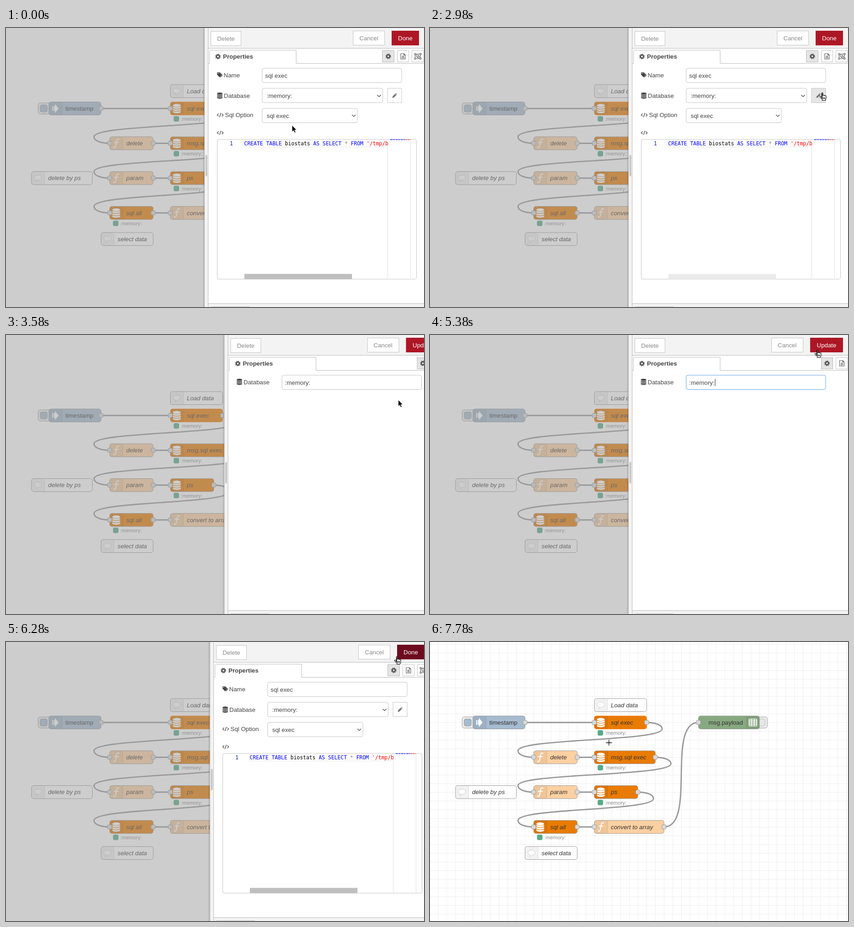
An HTML page that plays this animation: 917x611 px, repeating every 8 s.

```html
<!DOCTYPE html>
<html lang="en">
<head>
<meta charset="utf-8">
<title>Flow editor</title>
<style>
html, body { margin: 0; width: 100%; height: 100%; overflow: hidden; background: #fff; }
svg { display: block; }
text { font: 13.34px "Liberation Sans", Arial, sans-serif; fill: #444; }
.node { fill: #333; }
.it { font-style: italic; }
.status { font-size: 11.44px; fill: #888; }
.mid { text-anchor: middle; }
.end { text-anchor: end; }
.bold { font-weight: bold; }
.btn { fill: #fff; stroke: #c4c4c4; }
.btn-t { fill: #888; text-anchor: middle; }
.field { fill: #fff; stroke: #c4c4c4; }
.sel { fill: #e4e4e4; stroke: #bbb; }
.code text, .code-n { font: 11.43px "DejaVu Sans Mono", monospace; fill: #000; }
.code .k { fill: #00f; }
.code .s { fill: #f00; }
.code .o { fill: #778899; }
.code-n { fill: #0b216f; }
.line { fill: none; stroke: #bbb; }

/* every part changes in hard steps */
.an { animation: 8s step-end infinite; }
#panel { animation-name: slide; }
@keyframes slide {
  0% { transform: none; }
  41% { transform: translateX(330px); }
  42.875% { transform: translateX(484px); }
  44.75% { transform: translateX(43.5px); }
  46.625% { transform: none; }
  74.75% { transform: translateX(412px); }
  76.625% { transform: translateX(400px); }
  78.5% { transform: translateX(12px); }
  80.375% { transform: none; }
  86% { transform: translateX(46px); }
  87.875% { transform: translateX(464px); }
  89.75% { transform: translateX(500px); }
}
#nodeTray { animation-name: nodeTray; }
@keyframes nodeTray {
  0%, 76.625% { visibility: visible; }
  42.875% { visibility: hidden; }
}
#dbTray { animation-name: dbTray; }
@keyframes dbTray {
  0%, 76.625% { visibility: hidden; }
  42.875% { visibility: visible; }
}
#shade { animation-name: shade; }
@keyframes shade { 0% { opacity: 1; } 89.75% { opacity: 0; } }
#grid { animation-name: grid; }
@keyframes grid { 0% { opacity: 0; } 89.75% { opacity: 1; } }
#sql { animation-name: sql; }
@keyframes sql {
  0%, 24.125% { transform: none; }
  13%, 22.375% { transform: translateX(-52px); }
  14.875% { transform: translateX(-105px); }
}
#bar { fill: #bfbfbf; animation-name: bar; }
@keyframes bar {
  0%, 50% { transform: none; fill: #bfbfbf; }
  1.875% { transform: none; fill: #cdcdcd; }
  3.625% { transform: none; fill: #dcdcdc; }
  5.5%, 24.125% { transform: none; fill: #ebebeb; }
  13%, 22.375% { transform: translateX(39px); fill: #bfbfbf; }
  14.875% { transform: translateX(79px); fill: #bfbfbf; }
}
#edit { animation-name: edit; }
@keyframes edit { 0%, 42.875% { fill: #fff; } 37.25% { fill: #e6e6e6; } }
#done { fill: #ad1625; animation-name: done; }
@keyframes done { 0% { fill: #ad1625; } 78.5% { fill: #6e0a1e; } }
#update { fill: #ad1625; animation-name: update; }
@keyframes update { 0% { fill: #ad1625; } 69.125% { fill: #6e0a1e; } }
#dbName { animation-name: focus; }
@keyframes focus {
  0% { stroke: #c4c4c4; }
  54.125% { stroke: #93b2da; }
  56% { stroke: #62a0e8; }
}
#caret { animation-name: caret; }
@keyframes caret { 0% { opacity: 0; } 54.125% { opacity: 1; } }
#pointer { animation-name: move; }
@keyframes move {
  0% { transform: translate(627px, 213px); }
  1.875% { transform: translate(640px, 226px); }
  3.625% { transform: translate(660px, 246px); }
  5.5% { transform: translate(669px, 255px); }
  29.75% { transform: translate(700px, 215px); }
  31.625% { transform: translate(775px, 160px); }
  33.5% { transform: translate(835px, 126px); }
  35.375% { transform: translate(852px, 137px); }
  37.25% { transform: translate(861px, 142px); }
  42.875% { transform: translate(860px, 142px); }
  46.625% { transform: translate(850px, 136px); }
  48.5% { transform: translate(805px, 121px); }
  50.375% { transform: translate(750px, 106px); }
  52.25% { transform: translate(720px, 104px); }
  61.625% { transform: translate(742px, 98px); }
  63.5% { transform: translate(800px, 68px); }
  65.375% { transform: translate(842px, 42px); }
  67.25% { transform: translate(850px, 33px); }
  69.125% { transform: translate(851px, 33px); }
  71% { transform: translate(853px, 32px); }
  72.875% { transform: translate(856px, 32px); }
  74.75% { transform: translate(858px, 32px); }
  80.375% { transform: translate(861px, 30px); }
  82.25% { transform: translate(864px, 29px); }
  84.125% { transform: translate(866px, 28px); }
  87.875% { transform: translate(867px, 29px); }
  89.75% { transform: translate(740px, 90px); }
  91.625% { transform: translate(498px, 194px); }
  95.375% { transform: translate(430px, 212px); }
  97.25% { transform: translate(392.5px, 220.5px); }
}
#arrow { animation-name: arrow; }
@keyframes arrow {
  0%, 29.75%, 42.875%, 63.5%, 74.75%, 87.875% { visibility: visible; }
  3.625%, 37.25%, 50.375%, 67.25%, 78.5%, 91.625% { visibility: hidden; }
}
#beam { animation-name: beam; }
@keyframes beam {
  0%, 29.75%, 63.5% { visibility: hidden; }
  3.625%, 50.375% { visibility: visible; }
}
#hand { animation-name: hand; }
@keyframes hand {
  0%, 42.875%, 74.75%, 87.875% { visibility: hidden; }
  37.25%, 67.25%, 78.5% { visibility: visible; }
}
#cross { animation-name: cross; }
@keyframes cross { 0% { visibility: hidden; } 91.625% { visibility: visible; } }
</style>
</head>
<body>
<svg width="917" height="611" viewBox="0 0 917 611">
  <defs>
    <pattern id="cell" x="17.5" y="4.7" width="19.06" height="19.06" patternUnits="userSpaceOnUse">
      <path d="M.5 0V19.06M0 .5H19.06" stroke="#eee" fill="none"/>
    </pattern>
    <clipPath id="view"><rect x="522" y="244" width="316" height="306"/></clipPath>
    <!-- icons are centred on 0,0 -->
    <g id="i-db" fill="#fff">
      <ellipse cy="-6.6" rx="8.6" ry="3.4"/>
      <path id="disc" d="M-8.6-4.6C-7-1.8 7-1.8 8.6-4.6V-1.6C7 2 -7 2 -8.6-1.6Z"/>
      <use href="#disc" y="4.7"/><use href="#disc" y="9.4"/>
    </g>
    <g id="i-fn" fill="none" stroke="#fff" stroke-width="2" stroke-linecap="round">
      <path d="M6-8.5C3-11 1.2-8.5 .7-5L-1 5C-1.6 9-3.5 10.5-6 8.7M-4-1.8H4.5"/>
    </g>
    <g id="i-in" fill="#fff">
      <path d="M-1-10L7 0L-1 10V5H-3V-5H-1ZM-7-5H-4.3V-2H-7ZM-7-1.3H-4.3V1.3H-7ZM-7 2H-4.3V5H-7Z"/>
    </g>
    <path id="i-note" d="M-5 7.5C-3.5 6.5-3 5.5-3.2 4.3C-11 2-9.5-6.5 0-6.5C10.5-6.5 10.5 4.5 0 4.8C-1.5 6.5-3 7.3-5 7.5Z" fill="#fff" stroke="#ccc"/>
    <g id="i-table" fill="none" stroke="#fff" stroke-width="1.6">
      <rect x="-8.5" y="-7.5" width="17" height="15" rx="1.5"/>
      <path d="M-8.5-3.6H8.5M-8.5 0H8.5M-8.5 3.7H8.5M-3 -7V7M3-7V7"/>
    </g>
    <g id="i-gear" fill="none" stroke="#555">
      <circle r="3.3" stroke-width="2.8"/>
      <circle r="5" stroke-width="2" stroke-dasharray="1.96"/>
    </g>
    <g id="i-doc" fill="none" stroke="#555" stroke-width="1.1">
      <path d="M-5-6H2L5-3V6H-5ZM1.8-6V-2.8H5M-2.6-.5H2.6M-2.6 1.6H2.6M-2.6 3.7H2.6"/>
    </g>
    <g id="i-group" fill="none" stroke="#555">
      <path d="M-6-5H6V5H-6ZM-3.5-3H1.5V1H-3.5ZM1.5-1H3.7V3H-1.3V1"/>
      <path d="M-7.5-6.5h3v3h-3zM4.5-6.5h3v3h-3zM-7.5 3.5h3v3h-3zM4.5 3.5h3v3h-3z" fill="#fff"/>
    </g>
    <g id="i-data" fill="#444">
      <ellipse cy="-4.6" rx="6" ry="2.2"/>
      <path id="disc2" d="M-6-3.2C-5-1.2 5-1.2 6-3.2V-1.2C5 1.2-5 1.2-6-1.2Z"/>
      <use href="#disc2" y="3.2"/><use href="#disc2" y="6.3"/>
    </g>
    <path id="i-code" d="M-3.5-3L-6.5 0L-3.5 3M3.5-3L6.5 0L3.5 3M1.5-4.5L-1.5 4.5" fill="none" stroke="#444" stroke-width="1.3"/>
    <g id="i-tag"><path d="M-6-5.5H-2L4 .6L-.6 5.4L-6-.5Z" fill="#444"/><path d="M-.6-5.3L5.5 .8L1.3 5.2" fill="none" stroke="#444" stroke-width="1.3"/><circle cx="-4" cy="-3.4" r="1" fill="#fff"/></g>
    <path id="i-pen" d="M-5 5L-4.4 1.8L1.3-3.9L4-1.2L-1.7 4.4ZM2-4.6L3-5.5L5.6-2.9L4.7-1.9Z" fill="#777"/>
    <path id="i-chev" d="M-4-2L0 2L4-2" fill="none" stroke="#444" stroke-width="1.2"/>
  </defs>

  <rect width="917" height="611" fill="#fff"/>
  <rect id="grid" class="an" width="917" height="611" fill="url(#cell)"/>
  <g id="flow"></g>
  <rect id="shade" class="an" width="917" height="611" fill="#9b9b9b" fill-opacity=".5"/>

  <g id="panel" class="an">
    <rect x="432" width="4" height="611" fill="#000" opacity=".09"/>
    <rect x="435.5" width="500" height="611" fill="#f3f3f3"/>
    <path class="line" d="M435.5 0V611"/>
    <rect x="437.5" y="278" width="4" height="47" rx="2" fill="#c6c6c6"/>
    <rect x="444" y="45" width="490" height="558" fill="#fff"/>
    <path class="line" d="M443.5 0V611M444 44.5H934M444 603.5H934M444 77.5H446.5V52Q446.5 48.5 449 48.5H636.5V77.5H934"/>
    <path class="line" d="M449.5 611V610.5H534V611"/>
    <rect class="btn" x="449.5" y="7.5" width="66" height="31"/>
    <text class="btn-t" x="482.5" y="28">Delete</text>
    <use href="#i-gear" x="465" y="62.5"/>
    <text class="bold" x="476" y="67">Properties</text>

    <g id="nodeTray" class="an">
      <rect class="btn" x="761.5" y="6.5" width="69" height="31"/>
      <text class="btn-t" x="796" y="27">Cancel</text>
      <rect id="done" class="an" x="846" y="6" width="60" height="32"/>
      <text class="mid" x="876" y="27" style="fill:#fff">Done</text>
      <rect class="sel" x="825.5" y="49.5" width="26" height="25"/><use href="#i-gear" x="838.7" y="62"/>
      <rect class="btn" x="858.5" y="49.5" width="25" height="25"/><use href="#i-doc" x="871" y="62"/>
      <rect class="btn" x="890.5" y="49.5" width="26" height="25"/><use href="#i-group" x="903.5" y="62"/>

      <use href="#i-tag" x="469" y="102.5"/><text x="477.5" y="107.5">Name</text>
      <rect class="field" x="562" y="88" width="306" height="31.5" rx="4"/><text x="568.5" y="109">sql exec</text>
      <use href="#i-data" x="469" y="148"/><text x="478" y="153">Database</text>
      <rect class="field" x="562" y="132" width="264.5" height="31.5" rx="4"/><text x="572" y="153">:memory:</text>
      <use href="#i-chev" x="818.5" y="148.5"/>
      <rect id="edit" class="an btn" x="837" y="132" width="31" height="31.5"/><use href="#i-pen" x="852.5" y="148"/>
      <use href="#i-code" x="470" y="190.5"/><text x="480.5" y="195">Sql Option</text>
      <rect class="field" x="562" y="176" width="209" height="31.5" rx="4"/><text x="572" y="197">sql exec</text>
      <use href="#i-chev" x="763" y="192"/>
      <use href="#i-code" x="470" y="229.5"/>

      <rect class="field" x="463.5" y="244" width="437" height="306" rx="4"/>
      <text class="code-n" x="491" y="256.5">1</text>
      <path d="M523 245H838M523 260.5H838M523 245V261" stroke="#eee" stroke-width="1.5"/>
      <path d="M837.5 244V550M887.5 244V550" stroke="#e2e2e2"/>
      <g class="code" clip-path="url(#view)">
        <g id="sql" class="an">
          <text x="522.6" y="256.5"><tspan class="k">CREATE TABLE</tspan> biostats <tspan class="k">AS SELECT</tspan> <tspan class="o">*</tspan> <tspan class="k">FROM</tspan> <tspan class="s">'/tmp/biostats.csv'</tspan></text>
        </g>
        <rect id="bar" class="an" x="523" y="538.5" width="236" height="11.5"/>
      </g>
      <path d="M843 244.5H875" stroke="#33f" stroke-width="1.4" stroke-dasharray="5 1 4 1.5"/>
      <path d="M876 244.5H887" stroke="#f44" stroke-width="1.4" stroke-dasharray="4 1"/>
    </g>

    <g id="dbTray" class="an" visibility="hidden">
      <rect class="btn" x="749.5" y="6.5" width="69" height="31"/>
      <text class="btn-t" x="783.5" y="27">Cancel</text>
      <rect id="update" class="an" x="834" y="6" width="72" height="32"/>
      <text class="mid" x="870" y="27" style="fill:#fff">Update</text>
      <rect class="sel" x="858.5" y="49.5" width="25" height="25"/><use href="#i-gear" x="871" y="62"/>
      <rect class="btn" x="890.5" y="49.5" width="26" height="25"/><use href="#i-doc" x="903.5" y="62"/>
      <use href="#i-data" x="468.5" y="102.5"/><text x="477.5" y="107.5">Database</text>
      <rect id="dbName" class="an field" x="562" y="88" width="306" height="31.5" rx="4"/>
      <text x="568.5" y="109">:memory:</text>
      <path id="caret" class="an" d="M625.5 96V112" stroke="#333"/>
    </g>
  </g>

  <g id="pointer" class="an">
    <path id="arrow" class="an" d="M.5 0V14.5L3.8 11.5L6 16.5L8.6 15.4L6.4 10.6H10.8Z" stroke="#fff"/>
    <path id="beam" class="an" d="M-3-8.5Q0-8.5 0-6Q0-8.5 3-8.5M0-6.5V6.5M-3 8.5Q0 8.5 0 6Q0 8.5 3 8.5M-1.5 3H1.5" fill="none" stroke="#222" stroke-width="1.2"/>
    <path id="hand" class="an" d="M-1.6 9V1.2C-1.6-.6 1-.6 1 1.2V6C1 4.6 3.4 4.7 3.4 6.2C3.6 5 5.8 5.3 5.8 6.8C6.2 5.9 8 6.3 8 7.7V11C8 13 7 14 6.6 16.5H-.6C-1-14.5 0 14.5-3 12C-4.5 10-6.3 8.6-5.5 7.6C-4.6 6.7-3 7.5-1.6 9ZM1.4 10V13.5M3.4 10V13.5M5.4 10V13.5" fill="#fff" stroke="#000" stroke-width="1.1" stroke-linejoin="round"/>
    <path id="cross" class="an" d="M-6.5 0H6.5M0-6.5V6.5" stroke="#000" stroke-width="1.3"/>
  </g>
</svg>
<script>
const H = 28.6, R = 4.8;
const ORANGE = '#e97b00', PEACH = '#fdd0a2', BLUE = '#a6bbcf', GREEN = '#87a980';
const row = i => 176.2 + 76.25 * i;

const box = (x, y, w, h, fill, rx = R, stroke = '#999') =>
  `<rect x="${x}" y="${y}" width="${w}" height="${h}" rx="${rx}" fill="${fill}" stroke="${stroke}"/>`;
const label = (x, y, s, cls) => `<text x="${x}" y="${y}" class="${cls}">${s}</text>`;
const port = (x, y) => box(x - 4.8, y - 4.8, 9.5, 9.5, '#d9d9d9', 2.9);
const wire = d => `<path d="${d}" fill="none" stroke="#999" stroke-width="2.86"/>`;

function node({ x, y, w, fill, icon, text, ports = 'io', stroke, status, upright, right }) {
  const top = y - H / 2, ix = right ? x + w - H : x;
  const edge = right ? ix : ix + H;
  return box(x, top, w, H, fill, R, stroke) +
    `<rect x="${ix + .5}" y="${top + .5}" width="${H - .5}" height="${H - 1}" rx="4" opacity=".05"/>` +
    `<path d="M${edge} ${top + .5}v${H - 1}" stroke="#000" opacity=".12"/>` +
    `<use href="#i-${icon}" x="${ix + H / 2}" y="${y}"/>` +
    label(right ? ix - 7.5 : x + 36.3, y + 4.6, text, `node ${upright ? '' : 'it'} ${right ? 'end' : ''}`) +
    (ports.includes('i') ? port(x, y) : '') +
    (ports.includes('o') ? port(x + w, y) : '') +
    (status ? box(x + 7.7, y + 17.3, 11, 11, '#5a8', 2.5, '#5a8') + label(x + 23, y + 26.8, ':memory:', 'status') : '');
}
const note = (x, y, w, text) => node({ x, y, w, fill: '#fff', icon: 'note', text, ports: '' });
const sql = (x, i, w, text, stroke) =>
  node({ x, y: row(i), w, fill: ORANGE, icon: 'db', text, stroke, status: true });
const fn = (x, i, w, text) => node({ x, y: row(i), w, fill: PEACH, icon: 'fn', text });

// wire that leaves to the right and returns one row lower on the left
function loop(x, i) {
  const a = row(i), b = row(i + 1), m = (a + b) / 2, r = x + 34.3, l = 193, c = (r + l) / 2, q = (r - c) / 2;
  return wire(`M${x} ${a}C${x + 18} ${a} ${r} ${a + 5} ${r} ${a + 14.3}` +
    `C${r} ${a + 28} ${c + q} ${m - 5.2} ${c} ${m}S${l} ${b - 28} ${l} ${b - 14.3}` +
    `C${l} ${b - 5} ${l + 17} ${b} 227.5 ${b}`);
}
const straight = (x1, x2, i) => wire(`M${x1} ${row(i)}H${x2}`);

document.getElementById('flow').innerHTML = [
  straight(208.5, 360.5, 0), straight(323, 360.5, 1), straight(323, 360.5, 2), straight(323, 360.5, 3),
  loop(475, 0), loop(494.3, 1), loop(456, 2),
  wire(`M513.3 ${row(3)}C585 ${row(3)} 517.5 ${row(0)} 589 ${row(0)}`),
  box(70.5, 164, 30, 24.5, '#eee'), box(75, 168.5, 15.5, 15.5, BLUE, 3.5),
  box(710, 164, 30, 24.5, '#eee'), box(718, 168.5, 17, 15.5, '#e6e6e6', 3.5, '#bbb'),
  node({ x: 94, y: row(0), w: 114.5, fill: BLUE, icon: 'in', text: 'timestamp', ports: 'o', upright: true }),
  node({ x: 589, y: row(0), w: 133.7, fill: GREEN, icon: 'table', text: 'msg.payload', ports: 'i', upright: true, right: true }),
  sql(360.5, 0, 114.8, 'sql exec', '#ff7f0e'), sql(360.5, 1, 133.8, 'msg.sql exec'),
  sql(360.5, 2, 95.5, 'ps'), sql(227.5, 3, 95.5, 'sql all'),
  fn(227.5, 1, 95.5, 'delete'), fn(227.5, 2, 95.5, 'param'), fn(360.5, 3, 152.8, 'convert to array'),
  note(360.5, 138.2, 114.8, 'Load data'), note(56, row(2), 133.5, 'delete by ps'), note(208.5, 462.2, 114.5, 'select data')
].join('');
</script>
</body>
</html>
```
